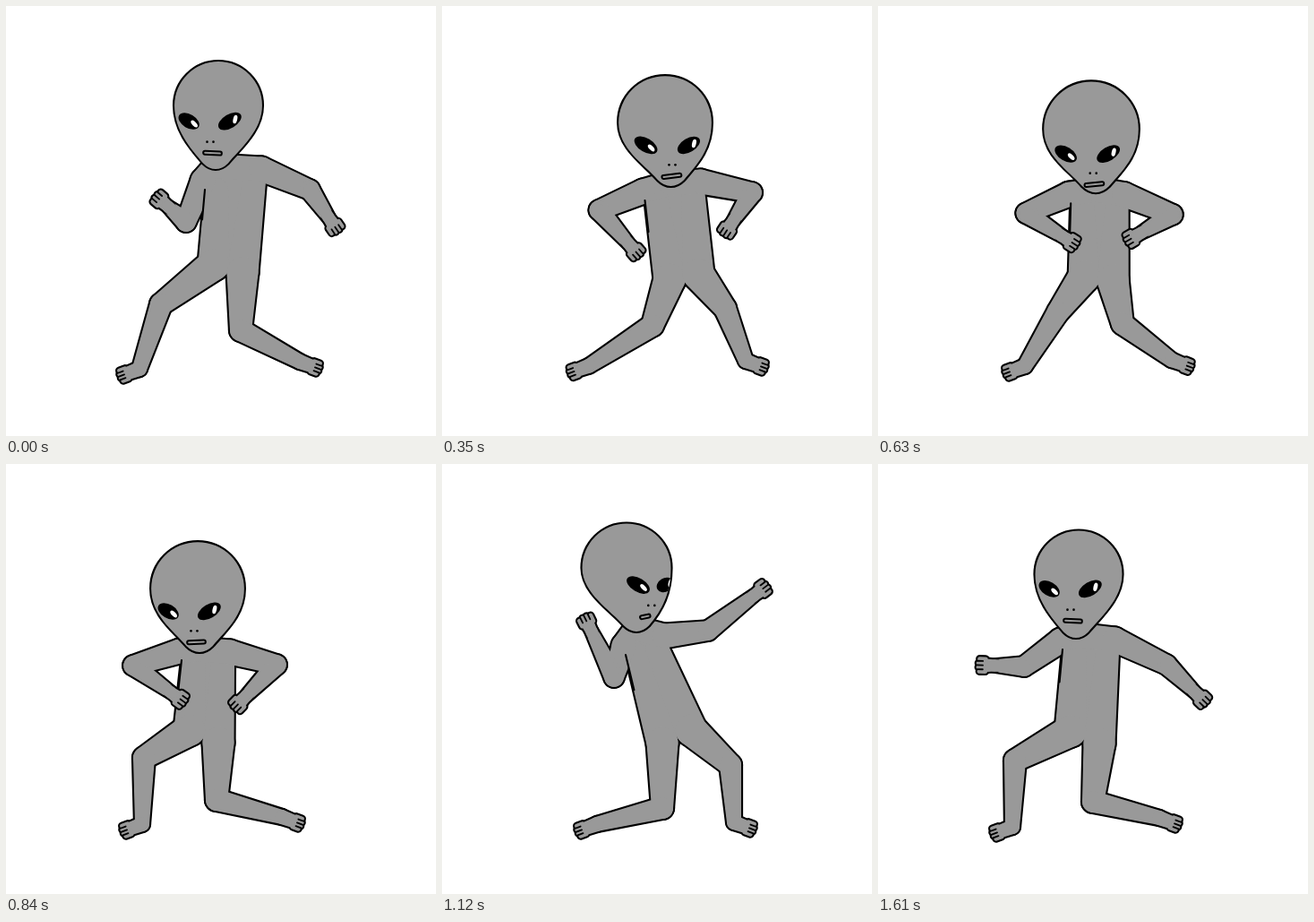
These frames come from a looping animation (480x480 px, 1.68 s). An HTML page with a canvas:

```html
<!DOCTYPE html>
<html lang="en">
<head>
<meta charset="utf-8">
<title>Dancing alien</title>
<style>
html, body { margin: 0; height: 100%; overflow: hidden; background: #fff; }
canvas { display: block; width: 100vmin; height: 100vmin; }
</style>
</head>
<body>
<canvas id="stage" width="480" height="480"></canvas>
<script>
const ctx = document.getElementById('stage').getContext('2d');
const STEP = 70, STEPS = 24, SKIN = '#999', INK = '#000', LINE = 2.1;

// Key poses; each starts with its step in the loop.
// Head: skull x, y, sideways shift of the chin, turn of the face
const head = [
  [0, 237,111, -3, -10],
  [3, 244,124, 6, 6],
  [7, 254,136, 7, -1],
  [12, 214,139, 2, -10],
  [16, 206,116, 11, 28],
  [20, 235,137, 1, 7],
  [23, 224,123, -3, -10]
];
// Arms: shoulder, elbow, wrist
const armL = [
  [0, 220,195, 201,241, 181,224],
  [3, 223,203, 170,220, 191,269],
  [7, 226,211, 181,235, 220,258],
  [12, 194,209, 142,225, 184,255],
  [14, 196,210, 153,232, 121,216],
  [16, 203,203, 192,238, 167,187],
  [18, 198,202, 133,196, 80,190],
  [20, 195,201, 149,200, 142,225],
  [23, 204,197, 163,226, 130,225]
];
const armR = [
  [0, 285,182, 339,205, 360,236],
  [1, 285,182, 345,190, 386,199],
  [3, 286,181, 342,178, 344,218],
  [7, 291,211, 346,239, 313,251],
  [12, 250,210, 302,224, 268,259],
  [16, 248,192, 297,186, 348,147],
  [20, 262,213, 327,230, 318,248],
  [23, 264,196, 322,224, 353,254]
];
// Legs: pelvis, left knee and ankle, right knee and ankle
const legs = [
  [0, 248,293, 173,333, 149,405, 262,362, 328,397],
  [3, 277,300, 238,362, 157,401, 334,334, 337,396],
  [7, 263,304, 232,351, 172,402, 298,341, 341,396],
  [12, 221,304, 154,328, 152,402, 235,375, 308,394],
  [16, 262,304, 246,384, 173,402, 322,336, 326,400],
  [20, 230,307, 173,346, 158,405, 248,372, 309,396],
  [23, 231,305, 153,331, 150,405, 240,377, 314,395]
];

const mix = (a, b, u) => a + (b - a) * u;

// The two keys around a step, and how far it lies between them
function around(track, step) {
  const i = track.findLastIndex(key => key[0] <= step);
  const a = track[i], b = track[i + 1] || [STEPS, ...track[0].slice(1)];
  return [a, b, (step - a[0]) / (b[0] - a[0])];
}

function sample(track, step) {
  const [a, b, u] = around(track, step);
  return a.map((v, i) => mix(v, b[i], u)).slice(1);
}

// Arm joints: each bone turns the short way round its parent
function sampleArm(track, step) {
  const [a, b, u] = around(track, step);
  const joints = [[mix(a[1], b[1], u), mix(a[2], b[2], u)]];
  for (const i of [3, 5]) {
    const [[angA, lenA], [angB, lenB]] = [a, b].map(k => {
      const dx = k[i] - k[i - 2], dy = k[i + 1] - k[i - 1];
      return [Math.atan2(dy, dx), Math.hypot(dx, dy)];
    });
    const turn = Math.atan2(Math.sin(angB - angA), Math.cos(angB - angA));
    const ang = angA + turn * u, len = mix(lenA, lenB, u);
    const [x, y] = joints.at(-1);
    joints.push([x + len * Math.cos(ang), y + len * Math.sin(ang)]);
  }
  return joints;
}

// Leg joints: the hips tilt with the knees, the feet point outwards
function sampleLegs(step) {
  const [px, py, ...p] = sample(legs, step);
  const tilt = 0.15 * (p[5] - p[1]);
  return [-1, 1].map((side, i) => {
    const [kx, ky, ax, ay] = p.slice(4 * i);
    return [[px + 16 * side, py + tilt * side], [kx, ky], [ax, ay], [ax + 16 * side, ay + 6]];
  });
}

function capsule([x0, y0], [x1, y1], r0, r1) {
  const path = new Path2D(), ang = Math.atan2(y1 - y0, x1 - x0);
  const ratio = (r0 - r1) / (Math.hypot(x1 - x0, y1 - y0) || 1);
  const off = Math.acos(Math.max(-1, Math.min(1, ratio)));
  path.arc(x0, y0, r0, ang + off, ang - off + 2 * Math.PI);
  path.arc(x1, y1, r1, ang - off, ang + off);
  path.closePath();
  return path;
}

const bones = (joints, radii) =>
  radii.slice(1).map((r, i) => capsule(joints[i], joints[i + 1], radii[i], r));

function polygon(points) {
  const path = new Path2D();
  points.forEach(p => path.lineTo(...p));
  path.closePath();
  return path;
}

// Outline of several shapes as one
function merge(paths) {
  ctx.lineWidth = LINE * 2;
  paths.forEach(p => ctx.stroke(p));
  ctx.fillStyle = SKIN;
  paths.forEach(p => ctx.fill(p));
}

function line([x0, y0], [x1, y1], width = LINE) {
  ctx.lineWidth = width;
  ctx.beginPath();
  ctx.moveTo(x0, y0);
  ctx.lineTo(x1, y1);
  ctx.stroke();
}

function ellipse(x, y, rx, ry, tilt, color) {
  ctx.fillStyle = color;
  ctx.beginPath();
  ctx.ellipse(x, y, rx, ry, tilt, 0, 2 * Math.PI);
  ctx.fill();
}

// Four fingers or toes around a tip, and the lines between them
function digits(from, [x, y], width) {
  const ang = Math.atan2(y - from[1], x - from[0]);
  const at = (along, across) => [
    x + along * Math.cos(ang) - across * Math.sin(ang),
    y + along * Math.sin(ang) + across * Math.cos(ang)
  ];
  return {
    shapes: [-0.85, -0.3, 0.3, 0.85].map(s =>
      capsule(at(-2, s * width), at(6 - 2 * s * s, s * width), 2.5, 2.5)),
    draw: () => [-0.58, 0, 0.58].forEach(s =>
      line(at(1, s * width), at(8, s * width), 1.8))
  };
}

function drawHand([, elbow, wrist]) {
  const ang = Math.atan2(wrist[1] - elbow[1], wrist[0] - elbow[0]);
  const palm = [wrist[0] + 12 * Math.cos(ang), wrist[1] + 12 * Math.sin(ang)];
  const fingers = digits(wrist, palm, 8);
  merge([capsule(wrist, palm, 6.5, 7.5), ...fingers.shapes]);
  ctx.fill(capsule(elbow, wrist, 7, 6.8));
  fingers.draw();
}

function drawBody(arms, legPair, chin) {
  const [shL, shR] = arms.map(a => a[0]);
  const [hipL, hipR] = legPair.map(l => l[0]);
  const neck = [chin[0], chin[1] - 3];
  const feet = legPair.map(l => digits(l[2], l[3], 7));
  const armpit = [shL[0] + 2, shL[1] + 10];
  merge([
    polygon([neck, shR, hipR, hipL, shL]),
    capsule([armpit[0] + 13, armpit[1]], hipL, 13, 17.5),
    capsule([shR[0] - 8, shR[1] + 14], hipR, 13, 17.5),
    capsule(neck, shL, 13.5, 13.5),
    capsule(neck, shR, 13.5, 13.5),
    ...arms.flatMap(a => bones(a, [13.5, 10.8, 6.8])),
    ...legPair.flatMap(l => bones(l, [17.5, 12, 8, 7])),
    ...feet.flatMap(f => f.shapes)
  ]);
  const side = [hipL[0] - 17.5, hipL[1]];
  line(armpit, armpit.map((v, i) => mix(v, side[i], 0.4)));
  feet.forEach(f => f.draw());
}

function skull(x, y, r, [cx, cy]) {
  const path = new Path2D();
  path.arc(x, y, r, Math.PI, 0);
  path.bezierCurveTo(x + r, y + .57 * r, cx + .58 * r, cy - .48 * r, cx + .28 * r, cy - .13 * r);
  path.quadraticCurveTo(cx + .15 * r, cy, cx, cy);
  path.quadraticCurveTo(cx - .15 * r, cy, cx - .28 * r, cy - .13 * r);
  path.bezierCurveTo(cx - .58 * r, cy - .48 * r, x - r, y + .57 * r, x - r, y);
  path.closePath();
  return path;
}

// Features slide with the turn of the face and sink as the head nods
function drawFace(x, y, chin, turn, nod) {
  const eyeY = y + 21.5 + 6.5 * nod;
  const gap = 24 - turn * turn / 87;
  for (const side of [-1, 1]) {
    const ex = x + turn + side * gap;
    const rx = 14.3 * (1 - Math.max(0, side * turn) / 90);
    ellipse(ex, eyeY, rx, 7.7, -0.54 * side, INK);
    ellipse(ex + 6, eyeY + 0.5 - 2.5 * side, 4.8, 2.3, 1.3 + 0.5 * side, '#fff');
  }
  const mx = chin[0] + 0.35 * turn, my = chin[1] - 14.5 + 5.5 * nod;
  for (const dx of [-3.5, 3.5])
    ellipse(mx + 0.25 * turn + dx, my - 12.5, 1.3, 1.3, 0, INK);
  const half = 9 - turn * turn / 150, slope = (x - chin[0]) / 55;
  const ends = [[mx - half, my - half * slope], [mx + half, my + half * slope]];
  line(...ends, 6);
  ctx.strokeStyle = SKIN;
  line(...ends, 2);
  ctx.strokeStyle = INK;
}

function draw(step) {
  const [x, y, shift, turn] = sample(head, step);
  const nod = Math.cos((step - 8.5) / STEPS * 2 * Math.PI);
  const chin = [x + shift, y + 71];
  const arms = [armL, armR].map(t => sampleArm(t, step));
  ctx.fillStyle = '#fff';
  ctx.fillRect(0, 0, 480, 480);
  ctx.strokeStyle = INK;
  ctx.lineCap = ctx.lineJoin = 'round';

  drawBody(arms, sampleLegs(step), chin);
  arms.forEach(drawHand);
  const face = skull(x, y, 50.4 + 2.4 * nod, chin);
  merge([face]);
  ctx.save();
  ctx.clip(face);
  drawFace(x, y, chin, turn, nod);
  ctx.restore();
}

function tick() {
  draw(Math.floor(performance.now() / STEP) % STEPS);
  requestAnimationFrame(tick);
}
tick();
</script>
</body>
</html>
```
